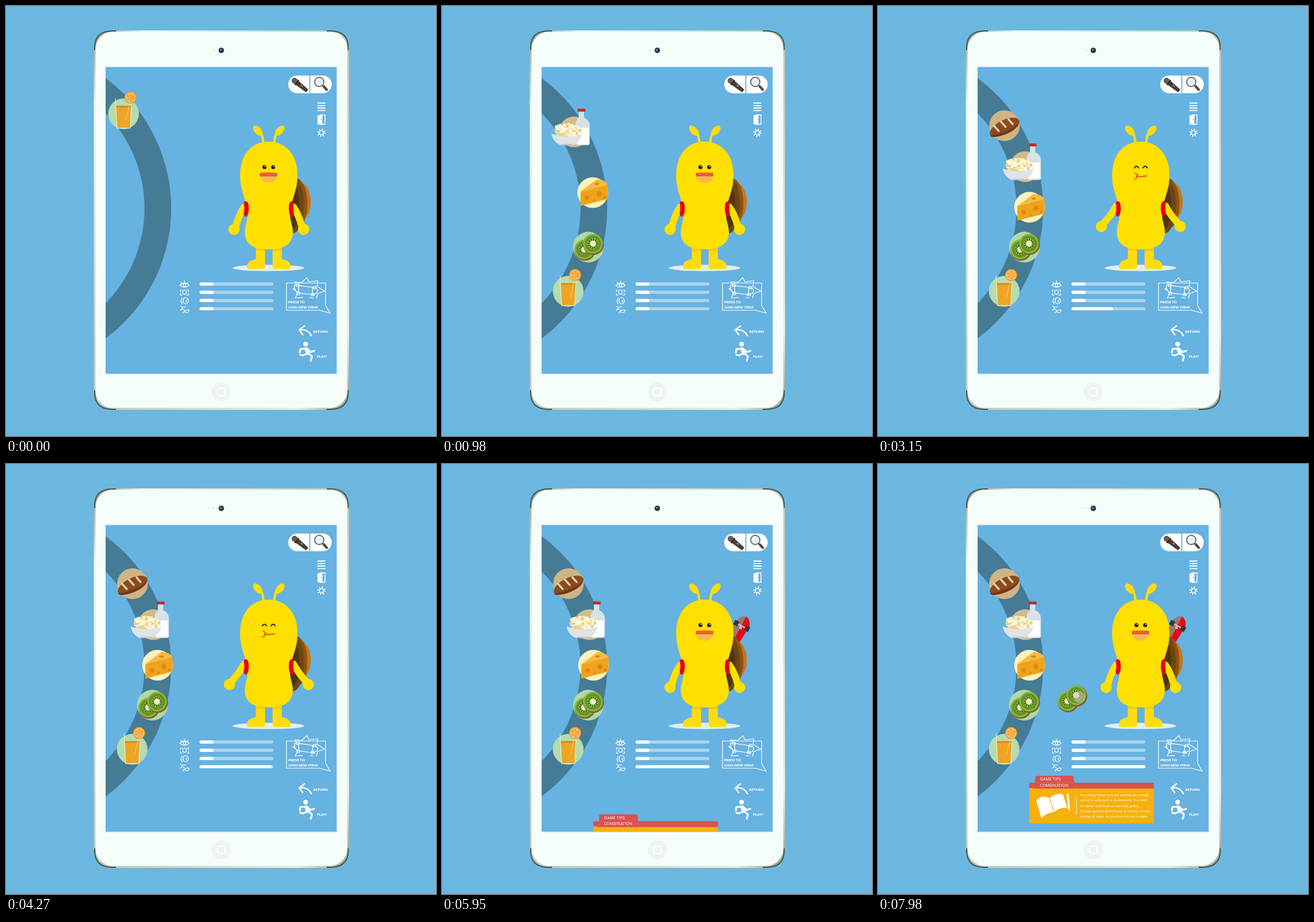
These frames come from a looping animation (742x742 px, 8000 ms). An HTML page:

```html
<!DOCTYPE html>
<html lang="en">
<head>
<meta charset="utf-8">
<title>Snack game</title>
<style>
html, body { margin: 0; width: 100%; height: 100%; overflow: hidden; background: #6cb7df; }
svg { display: block; width: 100vw; height: 100vh; }
.line { fill: none; stroke: #fff; stroke-linecap: round; stroke-linejoin: round; }
.label { font: 900 6.3px Lato, sans-serif; fill: #fff; }
.tab { font: 7.1px "Open Sans", sans-serif; fill: #fff; }
.tip { font: 7px "Liberation Serif", serif; fill: #fff; }
</style>
</head>
<body>
<svg viewBox="0 0 742 742">
<defs>
  <clipPath id="screen"><rect x="172" y="105.5" width="398.5" height="529"/></clipPath>
  <linearGradient id="rim" x2="1" y2="1">
    <stop offset="0" stop-color="#8f9a8c"/><stop offset=".1" stop-color="#eef3ea"/>
    <stop offset=".5" stop-color="#bcc7b8"/><stop offset=".9" stop-color="#e6ece2"/><stop offset="1" stop-color="#8f9a8c"/>
  </linearGradient>

  <g id="breadPic">
    <path d="M-25 15C-27 4-8-10 8-13C20-16 29-11 25-3C20 8 0 17-14 19C-21 20-25 19-25 15Z" fill="#8a4b22"/>
    <path d="M-24 17C-10 15 14 7 25-4C22 7 2 17-14 19C-21 20-24 19-24 17Z" fill="#6f3817"/>
    <path d="M-18 0l8 9M-6-7l8 9M7-11l7 8" stroke="#ecd2a4" stroke-width="3.6" stroke-linecap="round"/>
  </g>
  <g id="slice">
    <circle cx="1" cy="1.5" r="18" fill="#80602c"/>
    <circle r="17" fill="#8cb43a"/>
    <circle r="14" fill="#5f962a"/>
    <circle r="9.5" fill="#86b53c"/>
    <circle r="7.3" fill="none" stroke="#222d12" stroke-width="2.8" stroke-dasharray="1.3 2.53"/>
    <circle r="5" fill="#f0edc0"/>
  </g>
  <g id="kiwiPic"><use href="#slice" x="-7" y="4"/><use href="#slice" x="8" y="-6"/></g>

  <g id="board">
    <path d="M-16-40Q-11-55-1-57L2 53Q-14 56-16 47Z" fill="#9a7b68"/>
    <path d="M-1-57Q14-53 17-39L11 50Q8 55 0 54Z" fill="#e50b1b"/>
    <g id="truck">
      <path d="M-14-32H14" stroke="#ccc" stroke-width="3"/>
      <path d="M-20-38h11v12h-11zM9-38h11v12h-11z" fill="#3a3635"/>
      <circle cy="-27" r="3" fill="#eee"/><circle cy="-27" r="1.2" fill="#555"/>
    </g>
    <use href="#truck" y="60"/>
  </g>
  <g id="antenna">
    <path d="M440 219Q444 226 444 238" fill="none" stroke="#ffe000" stroke-width="4"/>
    <ellipse cx="434.5" cy="215" rx="6" ry="10.5" transform="rotate(-42 434.5 215)" fill="#ffdc0a"/>
  </g>
  <g id="leg">
    <path d="M431 414H447V449Q447 454 442 454H420Q415 454 416 448C417 440 425 438 431 437Z" fill="#ffdd0c"/>
    <path d="M431 418H447V423H431Z" fill="#efcb08"/>
  </g>
  <g id="armDown">
    <path d="M411 347Q402 360 397 379" fill="none" stroke="#ffe000" stroke-width="12" stroke-linecap="round"/>
    <circle cx="393.5" cy="385.5" r="9.7" fill="#ffe000"/>
  </g>
  <g id="armOut">
    <path d="M411 345Q403 360 391 373" fill="none" stroke="#ffe000" stroke-width="12" stroke-linecap="round"/>
    <circle cx="385.5" cy="380.5" r="9.7" fill="#ffe000"/>
  </g>
  <path id="strap" d="M411 339Q417 335 418 345Q419 358 415 362Q411 364 411 357Q413 348 411 339Z" fill="#e60012" stroke="#e60012" stroke-width="1.5"/>
  <path id="smileEyes" d="M442 280Q446 273 450 280M457 280Q461 273 465 280" fill="none" stroke="#33210c" stroke-width="1.9"/>
  <path id="corner" d="M153 76V72Q153 43 184 43H190" fill="none" stroke="#46564a" stroke-width="2"/>
  <rect id="track" x="334" width="127.5" height="5.4" rx="2.7"/>
  <rect id="level" x="334" width="24" height="5.4" rx="2.5"/>
</defs>

<rect width="742" height="742" fill="#6cb7df"/>
<rect x="151.5" y="42" width="440.5" height="655" rx="33" fill="url(#rim)"/>
<use href="#corner"/>
<use href="#corner" transform="matrix(-1 0 0 1 743.5 0)"/>
<use href="#corner" transform="matrix(1 0 0 -1 0 739)"/>
<use href="#corner" transform="matrix(-1 0 0 -1 743.5 739)"/>
<rect x="154.5" y="44.5" width="434.5" height="649" rx="30" fill="#f5fdfb"/>
<circle cx="358.5" cy="76.5" r="2" fill="#e4ebe8"/>
<circle cx="371.5" cy="76.5" r="4.8" fill="#2f3d4b"/><circle cx="370.5" cy="75.5" r="1.6" fill="#6d88a6"/>
<circle cx="371.5" cy="666" r="16.5" fill="#edf4f1"/>
<rect x="365" y="659.5" width="13" height="13" rx="3.5" fill="none" stroke="#fff" stroke-width="2"/>
<rect x="171" y="104.5" width="400.5" height="531" fill="#dcebf2"/>

<g clip-path="url(#screen)">
  <rect x="172" y="105" width="399" height="530" fill="#66b2e1"/>
  <circle cx="5.5" cy="349" r="256.5" fill="none" stroke="#457b95" stroke-width="46"/>

  <g id="juice">
    <circle r="26.5" fill="#b5dcae"/>
    <path d="M-13-14H13L11 24H-11Z" fill="#f0a425"/><path d="M-13-14H13V-11H-13Z" fill="#dc8d18"/>
    <path d="M-14-27L-11.5 25H11.5L14-27" fill="none" stroke="#e8f3dc" stroke-opacity=".75" stroke-width="1.3"/>
    <path d="M4 10L13-28" stroke="#f7d391" stroke-width="1"/>
    <circle cx="12" cy="-28" r="10.5" fill="#f29a25"/><circle cx="12" cy="-28" r="8.5" fill="#fbd28c"/>
    <circle cx="12" cy="-28" r="4" fill="none" stroke="#f5a233" stroke-width="7" stroke-dasharray="3.2 1"/>
  </g>
  <g id="kiwi"><circle r="26.5" fill="#b1d8a8"/><use href="#kiwiPic"/></g>
  <g id="cheese">
    <circle r="26.5" fill="#fdf2b8"/>
    <path d="M-21-2L7-23Q20-23 26-14Z" fill="#f6ba45"/>
    <path d="M-21-2L26-14V11L-21 23Z" fill="#efa31d"/>
    <g fill="#dc8c12"><circle cx="-10" cy="9" r="4"/><circle cx="11" cy="2" r="4.5"/><circle cx="20" cy="8" r="2.5"/><circle cx="2" cy="13" r="2"/><ellipse cx="7" cy="-15" rx="4" ry="2"/></g>
  </g>
  <g id="popcorn">
    <circle cx="3" r="26.5" fill="#d3bb8b"/>
    <path d="M11-37H20V-25Q30-20 30-10V19Q30 23 26 23H9Q5 23 5 19V-10Q5-20 11-25Z" fill="#d9e2e4"/>
    <path d="M7-7H28V18Q28 21 25 21H10Q7 21 7 18Z" fill="#fff"/>
    <rect x="9" y="-40" width="13.5" height="5" rx="1.5" fill="#c32a2a"/>
    <g id="kernels"></g>
    <path d="M-36 3Q-10 13 17 3Q15 17 1 23H-20Q-34 17-36 3Z" fill="#dfe3e6"/>
    <path d="M-20 23H1L0 21H-19Z" fill="#bcc4ca"/>
  </g>
  <g id="bread"><circle r="26.5" fill="#cfb384"/><use href="#breadPic"/></g>

  <ellipse cx="453" cy="452" rx="62" ry="5.5" fill="#e3ecee"/>
  <use id="packBoard" href="#board" transform="translate(506 300) rotate(28) scale(.73)"/>
  <ellipse cx="505" cy="338" rx="21" ry="34" fill="#c8741a"/>
  <ellipse cx="500" cy="341" rx="20" ry="44" fill="#8f5212"/>
  <ellipse cx="495" cy="343" rx="19" ry="49" fill="#6a4712"/>
  <ellipse cx="488" cy="345" rx="18" ry="46" fill="#51330f"/>
  <use href="#antenna"/><use href="#antenna" transform="matrix(-1 0 0 1 907 0)"/>
  <use href="#leg"/><use href="#leg" transform="matrix(-1 0 0 1 907 0)"/>
  <path d="M453 234C482 234 503 256 503 292C503 322 490 338 490 358C490 372 495 378 495 390C495 412 478 420 453 420C428 420 412 412 412 390C412 378 417 372 417 358C417 338 404 322 404 292C404 256 424 234 453 234Z" fill="#ffe000"/>
  <use class="arm"/><use class="arm" transform="matrix(-1 0 0 1 907 0)"/>
  <use href="#strap"/><use href="#strap" transform="matrix(-1 0 0 1 907 0)"/>
  <use id="handBoard" href="#board" transform="translate(530 399)"/>

  <g id="calm">
    <g fill="#2b1a0b"><circle cx="446" cy="278" r="3.5"/><circle cx="461" cy="278" r="3.5"/></g>
    <g fill="#fff"><circle cx="447.3" cy="276.8" r="1"/><circle cx="462.3" cy="276.8" r="1"/></g>
    <path d="M438 293Q440 305 453 305Q466 305 468 293Z" fill="#f6b950"/>
    <path d="M438 288Q453 286.500 468 288V294H438Z" fill="#e9602f"/>
  </g>
  <g id="chew">
    <use href="#smileEyes"/>
    <path id="lips" d="M443 288Q451 291 446 294Q448 297 442 299M447 293.500Q455 295 464 293" fill="none" stroke="#e6501c" stroke-width="1.9"/>
  </g>
  <g id="grin">
    <use href="#smileEyes"/>
    <path d="M438 287H468Q467 304 453 304Q439 304 438 287Z" fill="#e2562c"/>
    <path d="M442 297Q453 289 464 297Q460 304 453 304Q446 304 442 297Z" fill="#f6b064"/>
  </g>

  <g fill="#fff">
    <g opacity=".45"><use href="#track" y="477"/><use href="#track" y="491.300"/><use href="#track" y="505.500"/><use href="#track" y="519.700"/></g>
    <use href="#level" y="477"/><use href="#level" y="491.300"/><use href="#level" y="505.500"/>
    <rect id="energy" x="334" y="519.700" height="5.400" rx="2.500"/>
  </g>
  <g class="line" stroke-width="1.2">
    <path d="M300 482Q308 474 316 482Q308 489 300 482M302 477l1.500 1.500M308 474v2M314 477l-1.500 1.500"/>
    <circle cx="308" cy="481.500" r="2.300"/>
    <path d="M304 490H301V493M312 490H315V493M304 499H301V496M312 499H315V496M305 496V492Q308 488 311 492V496Q308 499 305 496"/>
    <path d="M304 504Q300 509 304 514M306.500 506Q304 509 306.500 512M310 503a4.500 5.500 0 1 1 0 11a4.500 5.500 0 1 1 0-11M311 507v4"/>
    <path d="M301 518l4 2-2 3 5 1M305 520l5-1M303 523l-2 2M308 527q4-4 8-2l-2 4h-5zM305 530l3-4"/>
  </g>

  <g class="line" stroke-width="1.2">
    <path d="M484 478H551.500V517L559.500 530L541 525H484Z"/>
    <path d="M498 476l12 1 9-8 4 7 15-2-1 10 13 8-12 4-3 11-8-4-11 8-5-8-12 1 5-10-9-6 8-5z"/>
    <path d="M498 485Q496 480 503 482L532 486Q541 488 536 495Q533 499 527 498L505 495Q498 493 498 485Z" fill="#66b2e1"/>
    <path d="M505 483v12M529 486v12M501 480h5v4h-5zM530 484h5v4h-5zM502 494h5v4h-5zM527 496h5v4h-5z"/>
  </g>
  <path d="M485.500 504.500H538V524H485.500Z" fill="#66b2e1"/>
  <text class="label" x="487" y="513">PRESS TO</text>
  <text class="label" x="487" y="522">GAIN NEW ITEM!</text>
  <path class="line" stroke-width="2.300" d="M527 569Q521 557 507 559M515 552L506 559L512 567"/>
  <text class="label" x="530" y="564">RETURN</text>
  <circle cx="517" cy="583.500" r="4" fill="#fff"/>
  <g class="line">
    <path stroke-width="6" d="M518 592L521 599"/>
    <path stroke-width="3" d="M517 591L508 592L507 598M519 591L526 597L532 595M520 599L513 603L508 602M522 599L528 605L526 612"/>
  </g>
  <text class="label" x="536.500" y="607">PLAY!</text>

  <rect x="487" y="120" width="75" height="30.500" rx="15.250" fill="#fff"/>
  <path d="M524.300 120V150.500" stroke="#66b2e1" stroke-width="1.800"/>
  <g transform="translate(498 129) rotate(39)">
    <path d="M3-4.500L28-3V3L3 4.500Z" fill="#493d37"/>
    <rect x="-5" y="-5" width="11" height="10" rx="4.500" fill="#655a52"/>
    <path d="M5-5.500V5.500" stroke="#292421" stroke-width="1.800"/><path d="M13-1H17" stroke="#b9b1aa" stroke-width="1.500"/>
  </g>
  <path d="M546 137L549 140" stroke="#777" stroke-width="3"/><path d="M548.500 139L553.500 144.500" stroke="#54483f" stroke-width="4.200" stroke-linecap="round"/>
  <circle cx="540.500" cy="131" r="8" fill="#e4eff2" stroke="#6d6d6b" stroke-width="2"/>
  <path d="M536 130Q537 126 541 126" class="line" stroke-width="1.500"/>
  <path class="line" stroke-width="1.800" d="M538 167.500H550.500M538 171.800H550.500M538 176H550.500M538 180.300H550.500"/>
  <path d="M537.500 189L546 186.500V205.500L537.500 204Z" fill="#fff"/>
  <path class="line" stroke-width="1.400" d="M546 188H550.500V204H546"/><circle cx="544" cy="196" r=".9" fill="#66b2e1"/>
  <circle cx="544.300" cy="218.700" r="3.700" class="line" stroke-width="1.600"/>
  <circle cx="544.300" cy="218.700" r="6" fill="none" stroke="#fff" stroke-width="2.400" stroke-dasharray="1.800 2.912"/>

  <g id="tips">
    <path d="M271 552V542Q271 538 275 538H334Q338 538 338 542V547Q338 550 342 550H476V562H271Z" fill="#d9524f"/>
    <path d="M261 553V620H476V560H346Q341 560 340 555Q339 549.500 334 549.500H277Q272 549.500 271 554Q270 557 266 557H261Z" fill="#f7b00d"/>
    <path d="M261 550H271V554Q270 558.500 265 559H261Z" fill="#d9524f"/>
    <path d="M271 549.500H335Q339 549.500 340 555Q341 560 346 560H265Q270 559 271 554Z" fill="#d9524f"/>
    <text class="tab" x="279.500" y="546.300">GAME TIPS</text>
    <text class="tab" x="279.500" y="557">COMBINATION</text>
    <path d="M273 580Q285 570 296 577Q306 567 319 570L327 594Q314 591 304 601Q293 600 282 611Z" fill="#fff"/>
    <path d="M296 577L304 601" stroke="#f7b00d" stroke-width="1.300"/>
    <path d="M326 570L328 569L330.500 592L331 599L328.500 593Z" fill="#fff" stroke="#fff"/>
    <path d="M342.500 574V605" stroke="#fff" stroke-width=".9"/>
    <text class="tip" x="349" y="573">By eating bread you are getting the energy</text>
    <text class="tip" x="349" y="582.300">and it is reflected in skateboard. You will</text>
    <text class="tip" x="349" y="591.600">be faster and have an exciting game.</text>
    <text class="tip" x="349" y="600.900">Energy gained from bread is lasting certain</text>
    <text class="tip" x="349" y="610">period of time, so you have to eat it often.</text>
  </g>

  <g id="breadDrag"><use href="#breadPic"/><circle cx="-2" cy="6" r="9" fill="#c3bcb8" opacity=".6"/></g>
  <g id="kiwiDrag"><use href="#kiwiPic"/><circle cx="13" cy="-3" r="10" fill="#c9c6bb" opacity=".55"/></g>
</g>
</svg>
<script>
const LOOP = 8000;
const $ = id => document.getElementById(id);
const clamp = v => Math.max(0, Math.min(1, v));
const span = (t, from, to) => clamp((t - from) / (to - from));
const show = (id, on) => $(id).style.display = on ? "" : "none";
const move = (id, x, y) => $(id).setAttribute("transform", `translate(${x} ${y})`);

// name, entry time, resting angle on the ring
const foods = [
  ["juice", -216, 34], ["kiwi", 77, 15.2], ["cheese", 370, -0.4],
  ["popcorn", 663, -16.3], ["bread", 985, -33.8]
];

let seed = 7;
const rnd = () => (seed = seed * 16807 % 2147483647) / 2147483647;
let corn = "";
for (let i = 0; i < 110; i++) {
  const a = rnd() * Math.PI * 2, r = Math.sqrt(rnd());
  const color = ["#fff6cf", "#f3e3a2", "#fffbe8", "#e6cf85"][i % 4];
  corn += `<circle cx="${-10 + 23 * r * Math.cos(a)}" cy="${-2 + 11 * r * Math.sin(a)}" r="2.600" fill="${color}"/>`;
}
$("kernels").innerHTML = corn;

function draw(t) {
  for (const [name, start, rest] of foods) {
    const a = Math.min(rest, -58 + Math.max(0, t - start) * 0.085) * Math.PI / 180;
    move(name, 5.5 + 256 * Math.cos(a), 349 + 256 * Math.sin(a));
  }

  const a = span(t, 1300, 2030), b = span(t, 2030, 2620);
  show("breadDrag", t >= 1300 && t < 2620);
  move("breadDrag", 219 + 126 * a + 108 * b, 206 + 36 * a + 48 * b);
  const k = span(t, 7400, 7980);
  show("kiwiDrag", t >= 7400);
  move("kiwiDrag", 253 + 81 * k, 416 - 11 * k);

  const chewing = t >= 2620 && t < 4900, happy = t >= 4900 && t < 5740;
  show("chew", chewing);
  show("grin", happy);
  show("calm", !chewing && !happy);
  show("handBoard", happy);
  show("packBoard", t >= 5740);
  for (const arm of document.querySelectorAll(".arm"))
    arm.setAttribute("href", chewing || happy ? "#armOut" : "#armDown");
  const bite = 1 - 0.12 * Math.sin((t - 3150) / 280 * Math.PI * 2);
  $("lips").setAttribute("transform", `translate(0 ${293.5 * (1 - bite)}) scale(1 ${bite})`);

  $("energy").setAttribute("width", 24 + 103.5 * (1 - (1 - span(t, 2650, 4700)) ** 2.2));

  show("tips", t >= 5825);
  move("tips", 0, 96 * (1 - span(t, 5825, 6235)));
}

function tick() {
  draw(performance.now() % LOOP);
  requestAnimationFrame(tick);
}
tick();
</script>
</body>
</html>
```
